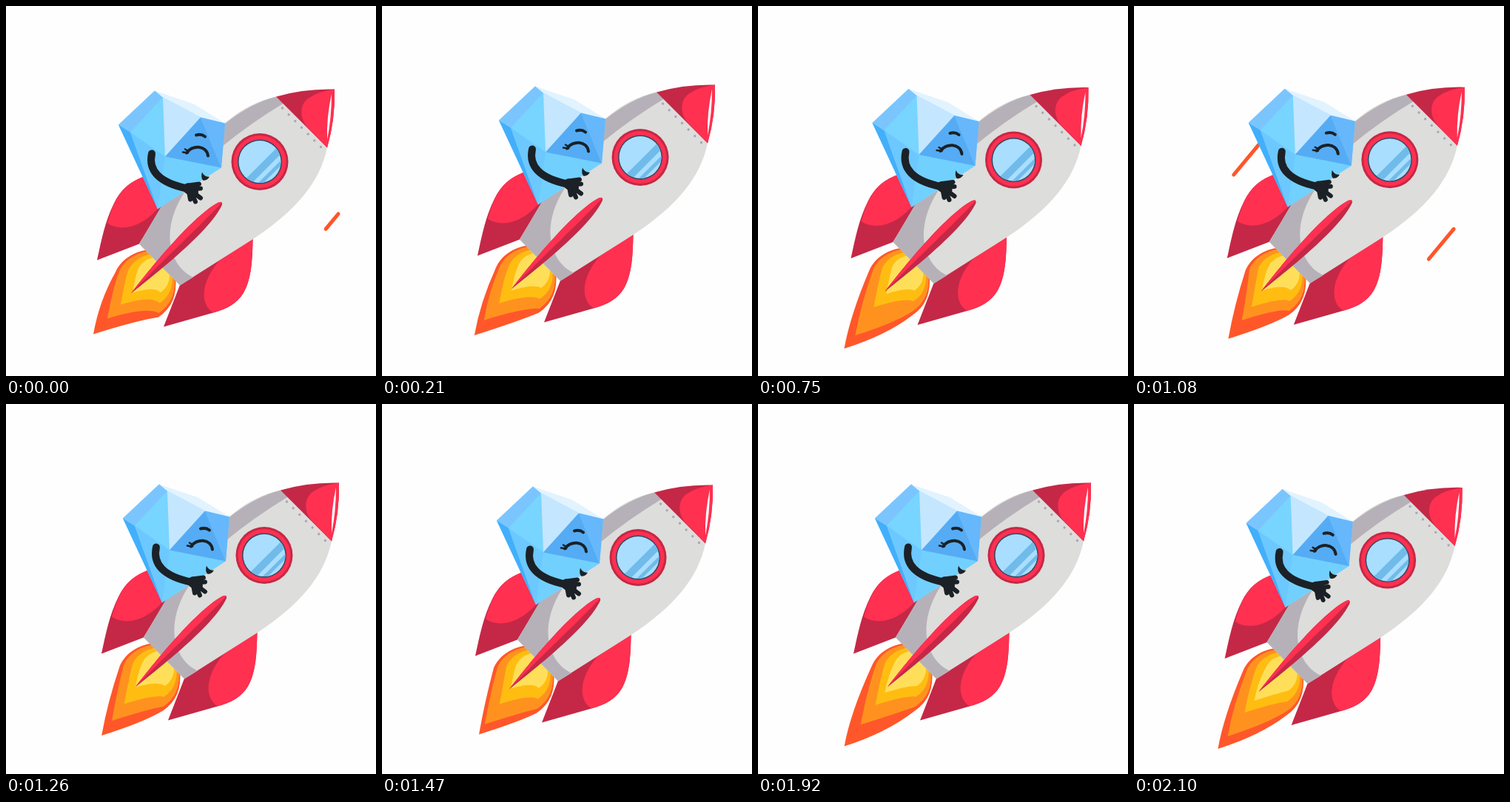
Write an HTML page that moves like this. It is 500x500 px and loops after 2160 ms.

```html
<!DOCTYPE html>
<html lang="en">
<head>
<meta charset="utf-8">
<title>Diamond on a rocket</title>
<style>
html, body { margin: 0; width: 100%; height: 100%; overflow: hidden; background: #fefefe; }
svg { display: block; width: 100vw; height: 100vh; }
.red { fill: #ff3050; }
.dark { fill: #c42846; }
.shade { fill: #b6b1b9; }
.ink { fill: none; stroke: #1b2126; stroke-linecap: round; stroke-linejoin: round; }
</style>
</head>
<body>
<svg viewBox="0 0 500 500">
  <defs><clipPath id="glass"><circle cx="343" cy="210" r="28.5"/></clipPath></defs>
  <g stroke="#ff5529" stroke-width="5" stroke-linecap="round">
    <line class="streak"/><line class="streak"/>
  </g>
  <g id="ship">
    <!-- left fin -->
    <path class="dark" d="M123 343 C129 315 134 290 146 266 C155 247 169 236 190 229 L212 268 L180 321Z"/>
    <path class="red" d="M137 293 C146 260 158 238 190 229 L208 270 C188 295 158 307 137 293Z"/>
    <g id="flame">
      <path fill="#ff572a"/><path fill="#ff921f"/><path fill="#ffbd12"/><path fill="#ffdf59"/>
    </g>
    <!-- right fin -->
    <path class="dark" d="M213 433 L236 374 L333.500 313 C333 341 332 368 321 387 C312 402 298 409 280 414Z"/>
    <path class="red" d="M333.500 313 C333 341 332 368 321 387 C312 402 298 409 280 414 C261 402 264 371 288 344Z"/>
    <!-- body -->
    <path fill="#dddddb" d="M434 191 C424 238 392 276 333 315 L235 377 L180 321 L241 223 C280 164 318 132 365 122Z"/>
    <path class="shade" d="M365 122 Q330 131 294 160 L290 191 Q330 158 375 131Z"/>
    <path class="shade" d="M210 270 L180 321 L235 377 L253 366 C221 351 207 303 242 250Z"/>
    <!-- nose -->
    <path class="dark" d="M365 122 Q402 111 444 112 Q445 153 434 191Z"/>
    <path class="red" d="M444 112 Q445 153 434 191 L407 163 C396 149 397 132 409 124 Q421 115 444 112Z"/>
    <path fill="#fff" d="M440 118 Q433 150 434 180 Q440 151 440 118Z"/>
    <path d="M373.500 137.500 L426 190.500" stroke="#aaa5b6" stroke-width="3.400" stroke-linecap="round" stroke-dasharray="0 12.300"/>
    <!-- window -->
    <circle class="dark" cx="343" cy="210" r="38.500"/>
    <circle class="red" cx="343" cy="210" r="35.500"/>
    <circle cx="343" cy="210" r="30" fill="#344762"/>
    <g clip-path="url(#glass)">
      <path fill="#a9deff" d="M310 175h66v66h-66z"/>
      <path stroke="#70bbea" stroke-width="10" d="M322 242 L378 186"/>
      <path stroke="#70bbea" stroke-width="5" d="M337 246 L383 200"/>
    </g>
    <!-- centre fin -->
    <path class="dark" d="M169 388 C198 350 254 282 287 265 Q293 263 292 268 C277 302 209 356 169 388Z"/>
    <path class="red" d="M169 388 C198 350 254 282 287 265 Q293 263 291 266 C264 295 213 342 169 388Z"/>
    <!-- gem -->
    <path fill="#72d0ff" d="M152 160 L201 114 L296 158 L291 218 L205 274Z"/>
    <path fill="#43affb" d="M152 160 L168 170 L205 274Z"/>
    <path fill="#6cc8ff" d="M168 170 L215 203 L205 274Z"/>
    <path fill="#7bc5ff" d="M152 160 L201 114 L212 123 L168 170Z"/>
    <path fill="#78d5ff" d="M168 170 L212 123 L215 203Z"/>
    <path fill="#c5e6ff" d="M212 123 L263 150 L215 203Z"/>
    <path fill="#e1f3ff" d="M201 114 L254 132 L296 158 L263 150 L212 123Z"/>
    <path fill="#55acf4" d="M263 150 L215 203 L291 218Z"/>
    <path fill="#66b7fc" d="M263 150 L296 158 L291 218Z"/>
    <!-- face -->
    <path class="ink" stroke-width="4" d="M244 198 C251 187 271 187 273 202"/>
    <path class="ink" stroke-width="2.500" d="M246 198 L239 197 M247 196 L242 193"/>
    <path class="ink" stroke-width="4" d="M257 174 Q264 172 269 176"/>
    <path fill="#1b2126" d="M265 224 Q268 231 275 230 Q272 236 266 235 Q263 231 265 224Z"/>
    <!-- arm -->
    <path class="ink" stroke-width="10" d="M197 199 C192 222 207 238 244 246"/>
    <path class="ink" stroke-width="14" d="M246 246 L253 251"/>
    <path class="ink" stroke-width="6" d="M246 242 L261 240 M249 247 L263 246 M251 250 L263 259 M250 250 L256 264 M247 250 L249 261"/>
  </g>
</svg>
<script>
const LOOP = 2160, STEP = 30;
// time, lift, then x,y of the four flame tips from outside in
const KEYS = [
  [0, 0, 118, 443, 137, 422, 155, 403, 171, 387],
  [420, 2, 125.6, 452, 132, 433, 154, 407, 170, 390],
  [750, 2.5, 114, 465, 129, 447, 154, 409, 171, 391],
  [1080, 2.8, 124.6, 452, 143, 427, 156, 409, 170, 387],
  [1470, 3, 128, 449, 136, 435, 156, 408, 171, 387],
  [1740, .4, 113.5, 465, 144, 424, 160, 404, 171, 388],
  [2100, -.4, 113.8, 465, 127, 448, 150, 416, 163, 400]
];
const STREAKS = [[449, 281], [185.5, 167]];
const STARTS = [-30, 480, 990], SPEED = .88, LAG = 60, REACH = 135;
const SIZES = [1, .92, .73, .52];
const ship = document.getElementById("ship");
const layers = document.querySelectorAll("#flame path");
const lines = document.querySelectorAll(".streak");
const mix = (a, b, k) => a + (b - a) * k;
const clamp = (v, max) => Math.max(0, Math.min(max, v));

function flamePath(x, y, size) {
  const at = (px, py) => `${mix(212, px, size)} ${mix(350, py, size)} `;
  return "M" + at(204, 328) + "C" + at(176, 328) + at(156, 341) + at(148, 359) +
    `Q${x + 8 * size} ${y - 45 * size} ${x} ${y}` +
    `Q${x + 57 * size} ${y - 18 * size} ` + at(206, 420) +
    "Q" + at(233, 402) + at(229, 365) + "Z";
}

function drawStreaks(t) {
  const start = STARTS.filter(s => s <= t).pop();
  const head = clamp((t - start) * SPEED, REACH);
  const tail = clamp((t - start - LAG) * SPEED, REACH);
  lines.forEach((line, i) => {
    const [x, y] = STREAKS[i];
    const ends = { x1: x - .64 * tail, y1: y + .77 * tail, x2: x - .64 * head, y2: y + .77 * head };
    for (const name in ends) line.setAttribute(name, ends[name]);
    line.style.display = head > tail ? "" : "none";
  });
}

function draw(now) {
  const t = Math.min(Math.floor(now % LOOP / STEP) * STEP, 2100);
  let i = 0;
  while (i < KEYS.length - 2 && t >= KEYS[i + 1][0]) i++;
  const from = KEYS[i], to = KEYS[i + 1];
  const k = (t - from[0]) / (to[0] - from[0]);
  const pulse = Math.sin(Math.PI * k) ** 2;
  const pose = from.map((v, n) => mix(v, to[n], k));
  const lift = mix(pose[1], 6, pulse);
  ship.setAttribute("transform", `translate(${lift} ${.5 - lift})`);
  layers.forEach((layer, n) => {
    const stretch = pulse * 3 * SIZES[n];
    layer.setAttribute("d", flamePath(pose[2 + 2 * n] - stretch, pose[3 + 2 * n] + stretch, SIZES[n]));
  });
  drawStreaks(t);
}

const begin = performance.now();
function tick() {
  draw(performance.now() - begin);
  requestAnimationFrame(tick);
}
tick();
</script>
</body>
</html>
```
